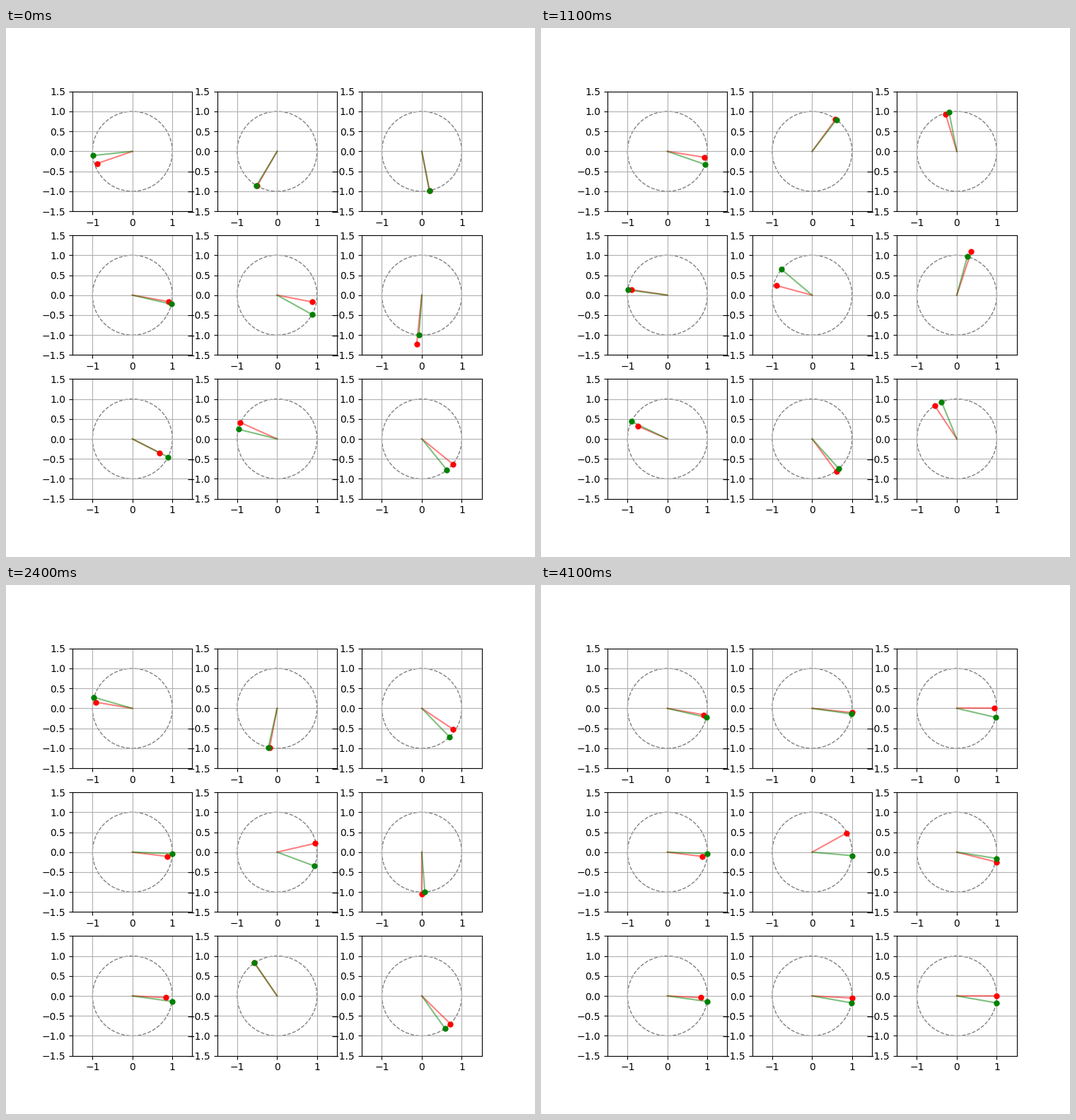
These frames come from a looping animation (748x748 px, 10000 ms). A matplotlib script:

```python
import numpy as np
import matplotlib.pyplot as plt
from matplotlib.animation import FuncAnimation
from matplotlib.lines import Line2D

FRAMES, INTERVAL = 100, 100

# Per panel: steps until it stops, then its first and last pose as
# (true phase in degrees, lead of the estimate, radius of the estimate).
PANELS = [
    (37, (186, 13, .93), (707, 3, .93)),
    (30, (239, 1, .99), (712, 2, 1)),
    (26, (281, 0, 1), (707, 13, .94)),
    (22, (347, 3, .93), (718, -5, .87)),
    (25, (331, 18, .89), (715, 34, .98)),
    (29, (266, -2, 1.23), (711, -5, 1.02)),
    (23, (333, 0, .77), (712, 5, .83)),
    (41, (166, -10, 1.02), (710, 7, 1.01)),
    (27, (309, 12, 1.01), (710, 10, 1)),
]

fig, axes = plt.subplots(3, 3, figsize=(7.48, 7.48), dpi=100)
for ax in axes.flat:
    ax.set(xlim=(-1.5, 1.5), ylim=(-1.5, 1.5), aspect="equal",
           xticks=[-1, 0, 1], yticks=np.arange(-1.5, 1.6, 0.5))
    ax.grid(True)
    ax.add_patch(plt.Circle((0, 0), 1, fill=False, color="gray", ls="--"))

# The panels never change, so render them once and reuse the picture.
fig.canvas.draw()
backdrop = np.array(fig.canvas.buffer_rgba())
for ax in axes.flat:
    ax.set_visible(False)
fig.figimage(backdrop)


def add_line(ax, **style):
    return fig.add_artist(Line2D([], [], transform=ax.transData, **style))


def make_hands(ax):
    colors = ("red", "green")
    arms = [add_line(ax, color=c, alpha=0.5) for c in colors]
    dots = [add_line(ax, color=c, marker="o", ms=5, ls="") for c in colors]
    return list(zip(arms, dots))


hands = [make_hands(ax) for ax in axes.flat]


def point_hand(hand, radius, degrees):
    arm, dot = hand
    angle = np.radians(degrees)
    x, y = radius * np.cos(angle), radius * np.sin(angle)
    arm.set_data([0, x], [0, y])
    dot.set_data([x], [y])


def update(step):
    for (steps, first, last), (estimate, truth) in zip(PANELS, hands):
        progress = min(step / steps, 1)
        phase, lead, radius = (a + (b - a) * progress
                               for a, b in zip(first, last))
        point_hand(estimate, radius, phase + lead)
        point_hand(truth, 1, phase)
    return [line for pair in hands for hand in pair for line in hand]


anim = FuncAnimation(fig, update, frames=FRAMES, interval=INTERVAL,
                     repeat=True, repeat_delay=0)
plt.show()
```
